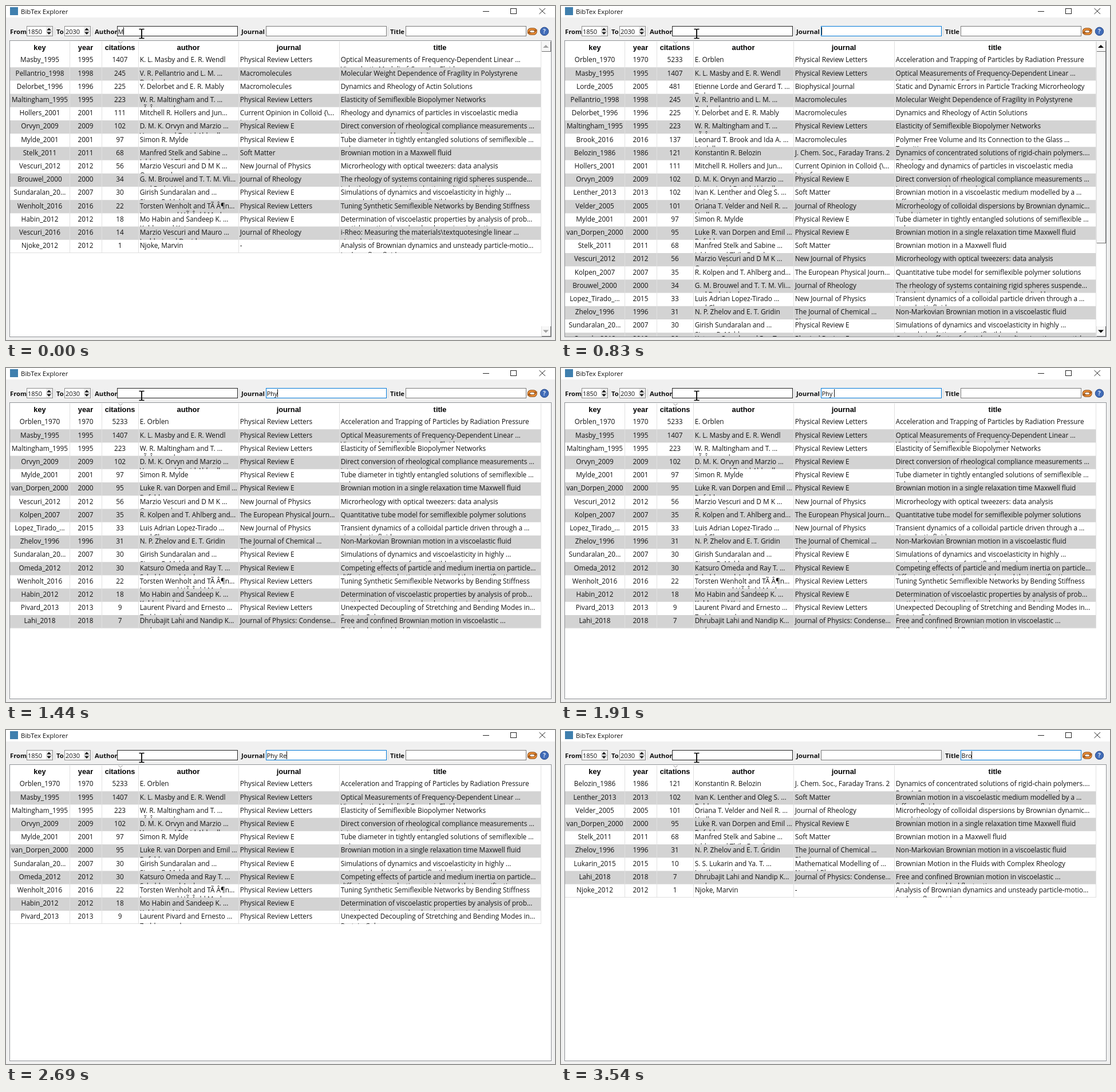
These frames come from a looping animation (959 px wide and 584 px high, 3950 ms). An HTML page with a canvas:

```html
<!DOCTYPE html>
<html lang="en">
<head>
<meta charset="utf-8">
<title>BibTex Explorer</title>
<style>
html, body { margin: 0; width: 100%; height: 100%; overflow: hidden; background: #f0f0f0; }
canvas { display: block; }
</style>
</head>
<body>
<canvas id="stage" width="959" height="584"></canvas>
<script>
const ctx = document.getElementById('stage').getContext('2d');
const LOOP = 3950;
const SANS = '"Open Sans", "Noto Sans", sans-serif';
const CELL = '11.8px ' + SANS;
const ENTRY = '11px ' + SANS;
const LABEL = 'bold 11.3px ' + SANS;
const HEAD = 'bold 12.8px "Liberation Sans", Arial, sans-serif';
const TOP = 84, PITCH = 23.2, BOTTOM = 578;
const EDGES = [7, 111, 167, 231, 406, 582, 934];
const HEADS = ['key', 'year', 'citations', 'author', 'journal', 'title'];

// key; year; citations; author; journal; title ("|" starts the wrapped second line)
const BOOKS = String.raw`
Orblen_1970; 1970; 5233; E. Orblen; Physical Review Letters; Acceleration and Trapping of Particles by Radiation Pressure
Masby_1995; 1995; 1407; K. L. Masby and E. R. Wendl; Physical Review Letters; Optical Measurements of Frequency-Dependent Linear ...|Viscoelastic Moduli of Complex Fluids
Lorde_2005; 2005; 481; Etienne Lorde and Gerard T. ...|Dolan; Biophysical Journal; Static and Dynamic Errors in Particle Tracking Microrheology
Pellantrio_1998; 1998; 245; V. R. Pellantrio and L. M. ...|Dorland; Macromolecules; Molecular Weight Dependence of Fragility in Polystyrene
Delorbet_1996; 1996; 225; Y. Delorbet and E. R. Mably; Macromolecules; Dynamics and Rheology of Actin Solutions
Maltingham_1995; 1995; 223; W. R. Maltingham and T. ...|vÃ Â¤n and; Physical Review Letters; Elasticity of Semiflexible Biopolymer Networks
Brook_2016; 2016; 137; Leonard T. Brook and Ida A. ...|Lindell; Macromolecules; Polymer Free Volume and Its Connection to the Glass ...|Transition
Belozin_1986; 1986; 121; Konstantin R. Belozin; J. Chem. Soc., Faraday Trans. 2; Dynamics of concentrated solutions of rigid-chain polymers....|Part 1. Brownian motion of persistent macromolecules
Hollers_2001; 2001; 111; Mitchell R. Hollers and Jun...; Current Opinion in Colloid {\...|Interface; Rheology and dynamics of particles in viscoelastic media
Orvyn_2009; 2009; 102; D. M. K. Orvyn and Marzio ...|Vescuri and David Aldwell; Physical Review E; Direct conversion of rheological compliance measurements ...|into storage and loss moduli
Lenther_2013; 2013; 102; Ivan K. Lenther and Oleg S. ...|Rublov and; Soft Matter; Brownian motion in a viscoelastic medium modelled by a ...|Jeffreys fluid
Velder_2005; 2005; 101; Oriana T. Velder and Neil R. ...|Hadley; Journal of Rheology; Microrheology of colloidal dispersions by Brownian dynamic...|simulations
Mylde_2001; 2001; 97; Simon R. Mylde; Physical Review E; Tube diameter in tightly entangled solutions of semiflexible ...|polymers
van_Dorpen_2000; 2000; 95; Luke R. van Dorpen and Emil ...|Rufeld; Physical Review E; Brownian motion in a single relaxation time Maxwell fluid
Stelk_2011; 2011; 68; Manfred Stelk and Sabine ...|Jelden and Thilo Franden; Soft Matter; Brownian motion in a Maxwell fluid
Vescuri_2012; 2012; 56; Marzio Vescuri and D M K ...|Orvyn and; New Journal of Physics; Microrheology with optical tweezers: data analysis
Kolpen_2007; 2007; 35; R. Kolpen and T. Ahlberg and...; The European Physical Journ...; Quantitative tube model for semiflexible polymer solutions
Brouwel_2000; 2000; 34; G. M. Brouwel and T. T. M. Vli...|and R. de Lind; Journal of Rheology; The rheology of systems containing rigid spheres suspende...|in both viscous and viscoelastic media, studied by
Lopez_Tirado_...; 2015; 33; Luis Adrian Lopez-Tirado ...|and Clara; New Journal of Physics; Transient dynamics of a colloidal particle driven through a ...|viscoelastic fluid
Zhelov_1996; 1996; 31; N. P. Zhelov and E. T. Gridin; The Journal of Chemical ...|Physics; Non-Markovian Brownian motion in a viscoelastic fluid
Sundaralan_20...; 2007; 30; Girish Sundaralan and ...|Simon R. Mylde; Physical Review E; Simulations of dynamics and viscoelasticity in highly ...|entangled solutions of semiflexible rods
Omeda_2012; 2012; 30; Katsuro Omeda and Ray T. ...|Schalder and Andrea; Physical Review E; Competing effects of particle and medium inertia on particle...|diffusion in viscoelastic materials, and their ramifications
Wenholt_2016; 2016; 22; Torsten Wenholt and TÃ Â¶n...|Lenzner and HÃ Â¤ld Markus; Physical Review Letters; Tuning Synthetic Semiflexible Networks by Bending Stiffness
Habin_2012; 2012; 18; Mo Habin and Sandeep K. ...|Kohlar and Katsuro; Physical Review E; Determination of viscoelastic properties by analysis of prob...|particle motion in molecular dynamics simulations
Lopez_Tirado_...; 2014; 17; L. A. Lopez-Tirado and G. ...|Helding; {EPL} (Europhysics Letters); Probing linear and nonlinear microrheology of viscoelastic ...|fluids
Vescuri_2016; 2016; 14; Marzio Vescuri and Mauro ...|Laddari and David; Journal of Rheology; i-Rheo: Measuring the materials\textquotesingle linear ...|viscoelastic properties in a step
Lukarin_2015; 2015; 10; S. S. Lukarin and Ya. T. ...|Lenther and; Mathematical Modelling of ...|Natural Phenomena; Brownian Motion in the Fluids with Complex Rheology
Pivard_2013; 2013; 9; Laurent Pivard and Ernesto ...|Zaddone and; Physical Review Letters; Unexpected Decoupling of Stretching and Bending Modes in...|Protein Gels
Lahi_2018; 2018; 7; Dhrubajit Lahi and Nandip K...|and; Journal of Physics: Condense...; Free and confined Brownian motion in viscoelastic ...|fluid and embedded fluctuations
Njoke_2012; 2012; 1; Njoke, Marvin; -; Analysis of Brownian dynamics and unsteady particle-motio...|in shear flow fluids`
  .trim().split('\n').map(line => line.split('; '));

const FIELDS = {
  author: { x: 194, label: 155, col: 3 },
  journal: { x: 454, label: 411, col: 4 },
  title: { x: 698, label: 671, col: 5 }
};

// start, focused field, typed text, scrollbar, filter when it lags behind the text
const STEPS = [
  [0, 'author', 'M', 'idle'],
  [70, 'author', 'M'],
  [140, 'author', 'Ma'],
  [300, 'author', 'Mas'],
  [830, 'journal', '', 'live'],
  [980, 'journal', 'P', 'live', ''],
  [1060, 'journal', 'P', 'idle'],
  [1130, 'journal', 'P'],
  [1290, 'journal', 'Ph'],
  [1440, 'journal', 'Phy'],
  [1910, 'journal', 'Phy '],
  [2460, 'journal', 'Phy R'],
  [2690, 'journal', 'Phy Re'],
  [3250, 'title', '', 'live'],
  [3310, 'title', 'B'],
  [3540, 'title', 'Bro']
];

function rect(x, y, w, h, fill) {
  ctx.fillStyle = fill;
  ctx.fillRect(x, y, w, h);
}

function frame(x, y, w, h, fill, stroke) {
  rect(x, y, w, h, fill);
  ctx.strokeStyle = stroke;
  ctx.lineWidth = 1;
  ctx.strokeRect(x + 0.5, y + 0.5, w - 1, h - 1);
}

function text(str, x, y, font, align = 'left', fill = '#111') {
  ctx.font = font;
  ctx.textAlign = align;
  ctx.fillStyle = fill;
  ctx.fillText(str, x, y);
}

function path(points, stroke, width = 1) {
  ctx.beginPath();
  points.forEach(([x, y]) => ctx.lineTo(x, y));
  ctx.strokeStyle = stroke;
  ctx.lineWidth = width;
  ctx.stroke();
}

// Triangle centred on x, y; dir -1 points up, 1 points down
function arrow(x, y, half, dir, fill) {
  ctx.beginPath();
  ctx.moveTo(x - half, y - dir * half / 2);
  ctx.lineTo(x + half, y - dir * half / 2);
  ctx.lineTo(x, y + dir * half / 2);
  ctx.fillStyle = fill;
  ctx.fill();
}

function titleBar() {
  rect(0, 0, 959, 20, '#fff');
  rect(7, 2, 14, 14, '#3f7fae');
  text('BibTex Explorer', 26, 13.7, '11.4px ' + SANS);
  path([[833, 9.5], [844, 9.5]], '#222');
  ctx.strokeRect(881.5, 4.5, 10, 9);
  path([[931.5, 4], [942, 14]], '#222');
  path([[942, 4], [931.5, 14]], '#222');
}

function spinBox(label, labelX, x, value) {
  text(label, labelX, 49, LABEL);
  frame(x, 35, 46, 18, '#fff', '#8a8a8a');
  text(value, x + 2, 48.5, ENTRY);
  rect(x + 34, 36, 11, 16, '#ececec');
  rect(x + 34, 44, 11, 1, '#bbb');
  arrow(x + 39, 40.5, 4, -1, '#111');
  arrow(x + 39, 47.8, 4, 1, '#111');
}

function entry(name, focus, typed) {
  const { x, label } = FIELDS[name];
  text(name[0].toUpperCase() + name.slice(1), label, 49, LABEL);
  const hovered = name === 'author';
  const active = name === focus;
  frame(x, 35, 211, 18, '#fff', hovered ? '#222' : active ? '#0078d7' : '#7a7a7a');
  if (!active) return;
  text(typed, x + 1.5, 48.5, ENTRY);
  rect(Math.floor(x + 1.5 + ctx.measureText(typed).width), 37, 1, 14, '#111');
}

function resetIcon() {
  for (const [color, width] of [['#8a4a12', 4.6], ['#f0923a', 2.6]]) {
    ctx.beginPath();
    ctx.roundRect(913, 40.5, 12.5, 8, 4);
    ctx.strokeStyle = color;
    ctx.lineWidth = width;
    ctx.stroke();
  }
  arrow(924.5, 43.5, 4, 1, '#a85c1c');
  arrow(914, 46, 4, -1, '#a85c1c');
}

function helpIcon() {
  ctx.beginPath();
  ctx.arc(940.5, 44.3, 7.2, 0, 7);
  ctx.fillStyle = '#416cb8';
  ctx.fill();
  ctx.strokeStyle = '#2c4c88';
  ctx.lineWidth = 1;
  ctx.stroke();
  text('?', 940.5, 48, 'bold 10px ' + SANS, 'center', '#e4ecf8');
}

function toolBar(focus, typed) {
  for (const x of [85, 151, 408, 667]) rect(x, 37, 1, 15, '#d8d8d8');
  spinBox('From', 7, 36, '1850');
  spinBox('To', 88, 102, '2030');
  for (const name in FIELDS) entry(name, focus, typed);
  resetIcon();
  helpIcon();
}

function cell(value, col, y) {
  const left = EDGES[col], right = EDGES[col + 1];
  ctx.save();
  ctx.beginPath();
  ctx.rect(left, y, right - left, PITCH);
  ctx.clip();
  const centred = col < 3;
  const x = centred ? (left + right) / 2 : left + 2.7;
  value.split('|').forEach((line, i) =>
    text(line, x, y + 14.4 + i * 16.4, CELL, centred ? 'center' : 'left'));
  ctx.restore();
}

function table(rows) {
  frame(6, 60, 947, 519, '#fff', '#8f9296');
  ctx.save();
  ctx.beginPath();
  ctx.rect(7, 61, 945, BOTTOM - 61);
  ctx.clip();
  const end = TOP + rows.length * PITCH;
  rows.forEach((row, i) => {
    const y = TOP + i * PITCH;
    if (i % 2) rect(7, y, 927, PITCH, '#d3d3d3');
  });
  for (const x of EDGES.slice(1)) rect(x, 62, 1, end - 62, '#e0e0e0');
  rect(7, Math.round(end) - 1, 928, 1, '#dedede');
  rows.forEach((row, i) => row.forEach((value, col) => cell(value, col, TOP + i * PITCH)));
  HEADS.forEach((name, i) =>
    text(name, (EDGES[i] + EDGES[i + 1]) / 2, 77, HEAD, 'center', '#000'));
  path([[196.5, 62], [200, 65.5], [203.5, 62]], '#888');
  ctx.restore();
}

function raised(y, h) {
  rect(935, y, 17, h, '#f7f7f7');
  rect(935, y + h - 1, 17, 1, '#6a6a6a');
  rect(951, y, 1, h, '#6a6a6a');
  rect(935, y, 1, h, '#e2e2e2');
}

function scrollBar(mode) {
  if (!mode) return;
  const ink = mode === 'live' ? '#000' : '#a0a0a0';
  raised(62, 18);
  raised(560, 18);
  if (mode === 'live') raised(80, 335);
  arrow(943, 70.5, 5, -1, ink);
  arrow(943, 569, 5, 1, ink);
}

function pointer() {
  path([[232.5, 40.5], [236, 40.5], [237, 41.5], [238, 40.5], [241.5, 40.5]], '#000', 1.4);
  path([[232.5, 56.5], [236, 56.5], [237, 55.5], [238, 56.5], [241.5, 56.5]], '#000', 1.4);
  path([[237, 41], [237, 56]], '#000', 1.8);
}

function draw(now) {
  const t = now % LOOP;
  const [, focus, typed, bar, query = typed] = STEPS.findLast(step => step[0] <= t);
  const words = query.split(' ');
  const rows = BOOKS.filter(book => words.every(w => book[FIELDS[focus].col].includes(w)));
  rect(0, 0, 959, 584, '#f0f0f0');
  titleBar();
  toolBar(focus, typed);
  table(rows);
  scrollBar(bar);
  pointer();
}

const start = performance.now();
function tick() {
  draw(performance.now() - start);
  requestAnimationFrame(tick);
}
tick();
</script>
</body>
</html>
```
